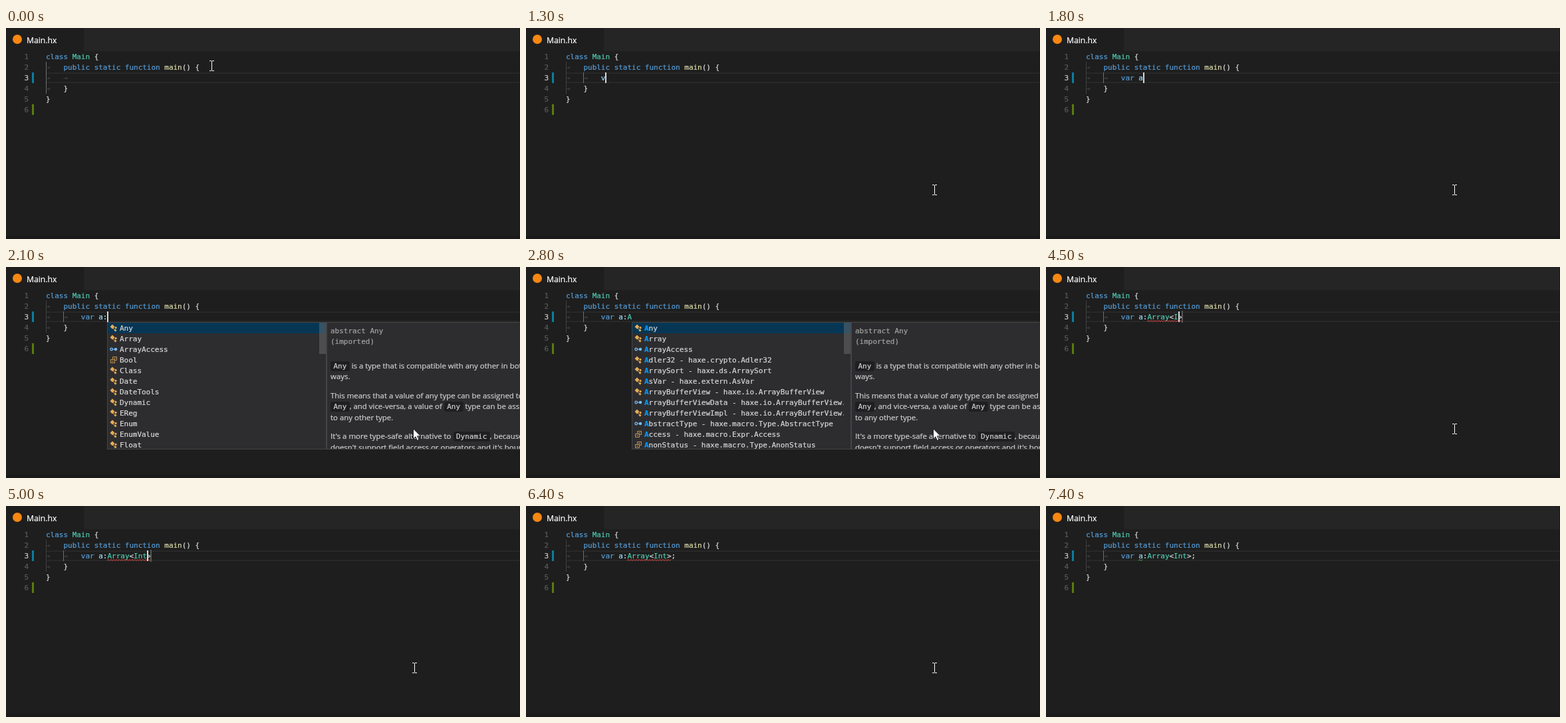
Write an HTML page that moves like this. It is 773x318 px and loops after 7800 ms.

```html
<!DOCTYPE html>
<html lang="en">
<head>
<meta charset="utf-8">
<title>Code completion</title>
<style>
html, body { margin: 0; width: 100%; height: 100%; overflow: hidden; background: #1e1e1e; }
body { position: relative; color: #d8d8d8; font: 11px/16px "DejaVu Sans Mono", monospace; letter-spacing: -.02px;
  -webkit-text-stroke: .22px; }
body > *, .menu > *, .thumb { position: absolute; box-sizing: border-box; }
div { white-space: pre; }
b { font-weight: normal; }
.k { color: #569cd6; }
.t { color: #4ec9b0; }
.f { color: #dcdcaa; }
.v { color: #9cdcfe; }
.w { color: #404040; }
#bar { left: 0; top: 0; width: 100%; height: 35px; background: #252526; }
#tab { left: 0; top: 0; width: 117px; height: 35px; padding-left: 31px; background: #1e1e1e; color: #fff;
  font: 12.2px/38px "Open Sans", sans-serif; letter-spacing: 0; }
#dot { left: 10px; top: 10px; width: 14px; height: 14px; border-radius: 50%; background: #f68712; }
#foot { left: 0; top: 313px; width: 100%; height: 5px; background: #1a1a1b; }
#edge { left: 772px; top: 0; width: 1px; height: 100%; background: #1a1a1b; }
#row { left: 60px; top: 67px; width: 712px; height: 16px; border: solid #282828; border-width: 2px 0; }
#nums { left: 0; top: 35px; width: 34px; padding-top: 1px; text-align: right; color: #5a5a5a; }
#nums b { color: #c6c6c6; }
.mark { left: 39px; width: 3px; height: 16px; }
.guide { width: 1px; }
.code { left: 60px; padding-top: 1px; }
#caret { top: 67px; width: 2px; height: 16px; background: #d8d8d8; }
#stop { top: 66px; width: 2px; height: 18px; background: #555; }
#waves { left: 0; top: 0; fill: none; }
.menu { left: 0; top: 83px; height: 192px; width: 0; }
.list, .doc { top: 0; height: 100%; overflow: hidden; background: #2d2d30; border: 1px solid #454545; }
.list { left: 0; }
.item { height: 16px; padding: 1px 0 0 18px; position: relative; width: 318px; overflow: hidden; box-sizing: border-box; }
.item.on { width: 100%; background: #073655; }
.item b { color: #0097fb; font-weight: bold; }
.item svg { position: absolute; left: 3px; top: 2px; }
.thumb { right: 0; top: 0; width: 10px; height: 47px; background: #797979; opacity: .42; }
.doc { left: 330px; width: 330px; padding: 5px; color: #d0d0d0; }
.head { color: #a3a3a3; margin-bottom: 19.75px; }
.para { font: 11.45px/16.5px "Open Sans", sans-serif; letter-spacing: 0; margin-bottom: 12px; }
.para code { font: 11px/0 "DejaVu Sans Mono", monospace; padding: 1px 4.4px; border-radius: 3px; background: #1f1f21; }
</style>
</head>
<body>
<div id="bar"></div>
<div id="tab">Main.hx</div>
<div id="dot"></div>
<div id="row"></div>
<div id="nums">1
2
<b>3</b>
4
5
6</div>
<div class="mark" style="top:67px;background:#0c7d9d"></div>
<div class="mark" style="top:115px;background:#587c0c"></div>
<div class="guide" id="outer" style="left:60px;top:51px;height:48px"></div>
<div class="guide" id="inner" style="left:86px;top:67px;height:16px;background:#707070"></div>
<div class="code w" style="top:51px">→
→   →
→</div>
<div class="code" style="top:35px"><b class="k">class</b> <b class="t">Main</b> {
    <b class="k">public static function</b> <b class="f">main</b>() {

    }
}</div>
<div class="code" id="line" style="top:67px"></div>
<svg id="waves" width="773" height="318">
  <path id="err" stroke="#f14c4c"/>
  <path id="warn" stroke="#4db04d"/>
</svg>
<div id="stop"></div>
<div id="caret"></div>
<div id="foot"></div>
<div id="edge"></div>
<div class="menu" id="menu"></div>
<svg id="beam" width="7" height="16" fill="none">
  <path d="M0 .5H3M4 .5H7M3.5 1V15M0 15.5H3M4 15.5H7" stroke="#fff"/>
</svg>
<svg id="arrow" width="12" height="20">
  <path d="M.5 .8V16L4 12.7L6.4 18.4L8.9 17.3L6.5 11.8H11.4Z" fill="#fff" stroke="#000" stroke-width=".8"/>
</svg>
<script>
const $ = id => document.getElementById(id);
const LOOP = 7800;
const colX = n => Math.round(60 + 6.6 * n);

const icons = {
  c: '<path d="M.5 4L4 .5L7.5 4L4 7.5Z M7 5.5L9 3.5L11 5.5L9 7.5Z M6.5 9.5L8.5 7.5L10.5 9.5L8.5 11.5Z" fill="#e8ab53"/><path d="M5 6L7.5 9" stroke="#e8ab53"/>',
  i: '<circle cx="2.7" cy="6" r="1.8" fill="none" stroke="#75beff" stroke-width="1.3"/><path d="M4.5 6H7" stroke="#75beff"/><circle cx="9" cy="6" r="2.2" fill="#75beff"/>',
  e: '<path d="M4.5 5V1.5H10.5V6.5H8M1.5 5.5H7.5V10.5H1.5ZM3 8H6M6 3.8H9" fill="none" stroke="#e8ab53" opacity=".8"/>',
  k: '<path d="M1.5 2.5H10.5V9.5H1.5ZM3 5H9M3 7H7" fill="none" stroke="#c5c5c5"/>'
};

const anyDoc = ['abstract Any\n(imported)',
  '`Any` is a type that is compatible with any other in both\nways.',
  'This means that a value of any type can be assigned to\n`Any`, and vice-versa, a value of `Any` type can be assigned\nto any other type.',
  "It's a more type-safe alternative to `Dynamic`, because it\ndoesn't support field access or operators and it's bound to"];
const arrayDoc = ['class Array<T>\n(imported)',
  'An `Array` is a storage for values. You can access it using\nindexes or with its API.'];
const intDoc = ['abstract Int\n(imported)',
  'The standard `Int` type. Its precision depends on the\nplatform.'];

const inScope = ['c Any', 'c Array', 'i ArrayAccess'];
const arrays = ['c ArraySort - haxe.ds.ArraySort'];
const buffers = ['c ArrayBufferView - haxe.io.ArrayBufferView',
  'i ArrayBufferViewData - haxe.io.ArrayBufferView.ArrayBufferViewData',
  'c ArrayBufferViewImpl - haxe.io.ArrayBufferView.ArrayBufferViewImpl'];
const allTypes = [...inScope, 'e Bool', 'c Class', 'c Date', 'c DateTools', 'c Dynamic', 'c EReg', 'c Enum', 'c EnumValue', 'c Float'];

// col: column of the left edge, hit: matched letters
const menus = {
  v: { col: 9, hit: 1, items: ['k var', 'c Void', 'c Vector - haxe.ds.Vector', 'e ValueType - Type.ValueType',
    'c ValueException - haxe.ValueException', 'i Var - haxe.macro.Expr.Var', 'e VarAccess - haxe.macro.Type.VarAccess',
    'c VectorData - haxe.ds.VectorData', 'c Version - haxe.Version', 'c View - haxe.io.View',
    'c Value - haxe.Value', 'c Variant - haxe.Variant'] },
  colon: { col: 14, hit: 0, items: allTypes },
  colonDoc: { col: 14, hit: 0, items: allTypes, doc: anyDoc },
  a: { col: 15, hit: 1, doc: anyDoc, items: [...inScope, 'c Adler32 - haxe.crypto.Adler32', ...arrays,
    'c AsVar - haxe.extern.AsVar', ...buffers, 'i AbstractType - haxe.macro.Type.AbstractType',
    'e Access - haxe.macro.Expr.Access', 'e AnonStatus - haxe.macro.Type.AnonStatus'] },
  ar: { col: 15, hit: 2, doc: arrayDoc, items: [...inScope.slice(1), ...arrays, ...buffers] },
  int: { col: 21, hit: 1, doc: intDoc, items: ['c Int', 'c IntIterator', 'i Iterable', 'i Iterator',
    'i IMap - haxe.Constraints.IMap', 'c Int32 - haxe.Int32', 'c Int64 - haxe.Int64', 'c Int64Helper - haxe.Int64Helper',
    'c IntMap - haxe.ds.IntMap', 'c Input - haxe.io.Input', 'c Int32Array - haxe.io.Int32Array',
    'e ImportMode - haxe.macro.Expr.ImportMode'] }
};

// Each step changes part of the state; "|" marks the caret
const steps = [
  [0, { code: '|', on: 0, typed: 0, menu: '', err: 0, warn: 0, stop: 0, arrow: 0, mouse: [309, 57] }],
  [100, { mouse: [303, 54] }],
  [200, { mouse: [287, 61] }],
  [300, { mouse: [271, 72] }],
  [500, { on: 1, mouse: [322, 98] }],
  [600, { mouse: [450, 164] }],
  [700, { mouse: [572, 225] }],
  [800, { mouse: [614, 244] }],
  [1000, { on: 0 }],
  [1300, { code: 'v|', on: 1, typed: 1 }],
  [1400, { code: 'va|', menu: 'v', arrow: 1 }],
  [1500, { code: 'var|' }],
  [1600, { code: 'var |', menu: '', arrow: 0 }],
  [1800, { code: 'var a|' }],
  [1900, { code: 'var a:|' }],
  [2000, { menu: 'colon' }],
  [2100, { menu: 'colonDoc', arrow: 1 }],
  [2300, { code: 'var a:A|', menu: 'a' }],
  [2800, { on: 0 }],
  [2900, { code: 'var a:Ar|', on: 1, menu: 'ar' }],
  [3000, { code: 'var a:Arr|' }],
  [3100, { code: 'var a:Arra|' }],
  [3200, { code: 'var a:Array<|>', menu: '', arrow: 0, stop: 1 }],
  [3700, { on: 0 }],
  [4200, { on: 1, err: 1 }],
  [4500, { code: 'var a:Array<I|>' }],
  [4600, { menu: 'int', arrow: 1 }],
  [5000, { code: 'var a:Array<Int|>', menu: '', arrow: 0 }],
  [5300, { code: 'var a:Array<Int>|', stop: 0 }],
  [5800, { on: 0 }],
  [5900, { code: 'var a:Array<Int>;|', on: 1 }],
  [6400, { on: 0 }],
  [6700, { mouse: [609, 262] }],
  [6800, { mouse: [598, 292] }],
  [6900, { on: 1, mouse: null }],
  [7000, { err: 0, warn: 1 }],
  [7400, { on: 0 }]
];

const esc = s => s.replace(/</g, '&lt;').replace(/>/g, '&gt;');
const tint = code => code.replace(' |', '·').replace('|', '').replace(/var|[A-Z]\w*|[a-z]+|·|[<>]/g, w => {
  const kind = w === 'var' ? 'k' : w === '·' ? 'w' : /[A-Z]/.test(w) ? 't' : /[a-z]/.test(w) ? 'v' : '';
  return `<b class="${kind}">${esc(w)}</b>`;
});

function menuHtml({ items, hit, doc }) {
  const rows = items.map((item, i) => {
    const name = item.slice(2);
    return `<div class="item${i ? '' : ' on'}"><svg width="12" height="12">${icons[item[0]]}</svg>` +
      `<b>${name.slice(0, hit)}</b>${name.slice(hit)}</div>`;
  }).join('');
  const thumb = items.length > 11 ? '<div class="thumb"></div>' : '';
  const list = `<div class="list" style="width:${doc ? 330 : 430}px;height:${Math.min(192, items.length * 16 + 2)}px">${rows}${thumb}</div>`;
  if (!doc) return list;
  const [head, ...paras] = doc;
  const text = paras.map(p => `<div class="para">${p.replace(/`(\w+)`/g, '<code>$1</code>')}</div>`).join('');
  return `${list}<div class="doc"><div class="head">${esc(head)}</div>${text}</div>`;
}

function wave(from, to) {
  let d = `M${from} 82.5`;
  for (let x = from + 2, up = true; x <= to; x += 2, up = !up) d += `L${x} ${up ? 80.5 : 82.5}`;
  return d;
}

const show = (el, on) => { el.style.display = on ? '' : 'none'; };
const place = (el, x, y) => { el.style.left = x + 'px'; if (y !== undefined) el.style.top = y + 'px'; };

function draw(s) {
  const end = 8 + s.code.replace('|', '').indexOf('>') + 1;
  $('line').innerHTML = ' '.repeat(8) + tint(s.code);
  place($('caret'), colX(8 + s.code.indexOf('|')));
  show($('caret'), s.on);
  place($('stop'), colX(end) - 1);
  show($('stop'), s.stop);
  $('outer').style.background = s.typed ? '#404040' : '#707070';
  show($('inner'), s.typed);
  $('err').setAttribute('d', s.err ? wave(colX(14), colX(end)) : '');
  $('warn').setAttribute('d', s.warn ? wave(colX(12), colX(13)) : '');
  const menu = menus[s.menu];
  show($('menu'), menu);
  if (menu) {
    place($('menu'), colX(menu.col));
    $('menu').innerHTML = menuHtml(menu);
  }
  show($('beam'), s.mouse && !s.arrow);
  show($('arrow'), s.mouse && s.arrow);
  if (s.mouse) {
    const [x, y] = s.mouse;
    place($('beam'), x - 3, y - 8);
    place($('arrow'), x - 2, y - 1);
  }
}

let shown = -1;
const start = performance.now();
function tick(now) {
  const t = Math.max(0, now - start) % LOOP;
  const past = steps.filter(([at]) => at <= t);
  if (past.length !== shown) {
    shown = past.length;
    draw(Object.assign({}, ...past.map(step => step[1])));
  }
  requestAnimationFrame(tick);
}
tick(start);
</script>
</body>
</html>
```
